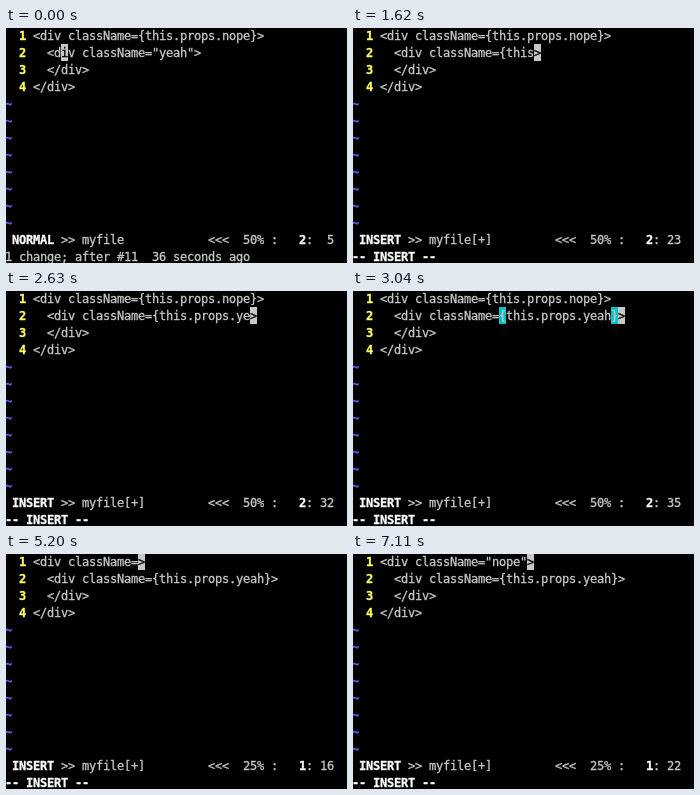
Animation, 341 px wide and 235 px high, one loop 8000 ms. Source, as an HTML page:

```html
<!DOCTYPE html>
<html lang="en">
<head>
<meta charset="utf-8">
<title>Editor session</title>
<style>
  html, body { margin: 0; width: 100%; height: 100%; overflow: hidden; background: #000; }
  svg { display: block; width: 341px; height: 235px; }
  text {
    font: 12px "DejaVu Sans Mono", "Liberation Mono", monospace; white-space: pre;
    color: #c7c7c7; fill: currentColor; stroke: currentColor; stroke-width: 0.3px;
  }
  .strong { font-weight: bold; color: #fff; }
  .number { font-weight: bold; color: #ffff5c; }
  .tilde { font-weight: bold; color: #5f5fff; }
  .under-cursor { color: #000; }
  .cursor { fill: #c7c7c7; }
  .match { fill: #00c5c7; }
</style>
</head>
<body>
<svg viewBox="0 0 341 235"><rect width="341" height="235"/><g id="screen"></g></svg>
<script>
const LOOP = 8000;
const CELL_W = 7, CELL_H = 17, ORIGIN = -1, BASELINE = 12;
const GUTTER = 4, STATUS_ROW = 12, MESSAGE_ROW = 13;
const screen = document.getElementById('screen');

const OUTER = '<div className=', INNER = '  <div className=';
const BEFORE = [OUTER + '{this.props.nope}>', INNER + '"yeah">', '  </div>', '</div>'];

// Each step: start time, mode, cursor row, cursor column, lines, extras
const steps = [{
  time: 0, mode: 'NORMAL', row: 1, col: 4, lines: BEFORE,
  file: 'myfile', message: '1 change; after #11  36 seconds ago'
}];

function type(row, prefix, typed, keys) {
  const base = steps[steps.length - 1].lines;
  for (const [time, count] of keys) {
    const text = prefix + typed.slice(0, count);
    const lines = base.map((line, i) => i === row ? text + '>' : line);
    steps.push({ time, mode: 'INSERT', row, col: text.length, lines, file: 'myfile[+]' });
  }
}

type(1, INNER, '{this.props.yeah}', [
  [500, 0], [1100, 1],
  [1390, 2], [1510, 4], [1620, 5], [1740, 6],
  [1920, 7], [2010, 8], [2100, 9], [2150, 10], [2240, 11], [2330, 12],
  [2510, 13], [2630, 14], [2690, 15], [2750, 16], [3040, 17]
]);
const closed = steps[steps.length - 1];
closed.match = [INNER.length, closed.col - 1];

steps.push({
  time: 4240, mode: 'NORMAL', row: 0, col: BEFORE[0].length - 1,
  lines: closed.lines, file: 'myfile[+]', message: ''
});

type(0, OUTER, '"nope"', [
  [5200, 0], [6160, 1], [6520, 2], [6640, 3], [6760, 4], [6880, 5], [7110, 6]
]);

const cellX = col => ORIGIN + col * CELL_W;

function add(name, attrs, content = '') {
  const node = document.createElementNS('http://www.w3.org/2000/svg', name);
  for (const key in attrs) node.setAttribute(key, attrs[key]);
  node.textContent = content;
  screen.append(node);
}

function print(row, col, content, style = '') {
  if (!content) return;
  const x = [...content].map((_, i) => cellX(col + i)).join(' ');
  add('text', { x, y: BASELINE + row * CELL_H, class: style }, content);
}

function block(row, col, style) {
  add('rect', {
    x: cellX(col), y: ORIGIN + row * CELL_H, width: CELL_W, height: CELL_H, class: style
  });
}

function draw(step) {
  screen.replaceChildren();
  const { mode, row, col, lines, file } = step;

  for (const c of step.match || []) block(row, GUTTER + c, 'match');
  block(row, GUTTER + col, 'cursor');

  lines.forEach((line, i) => {
    print(i, 2, String(i + 1), 'number');
    if (i !== row) return print(i, GUTTER, line);
    print(i, GUTTER, line.slice(0, col));
    print(i, GUTTER + col, line[col], 'under-cursor');
    print(i, GUTTER + col + 1, line.slice(col + 1));
  });
  for (let i = lines.length; i < STATUS_ROW; i++) print(i, 0, '~', 'tilde');

  const percent = (row + 1) * 100 / lines.length;
  print(STATUS_ROW, 1, mode, 'strong');
  print(STATUS_ROW, 8, '>> ' + file);
  print(STATUS_ROW, 29, `<<<  ${percent}% :`);
  print(STATUS_ROW, 42, String(row + 1), 'strong');
  print(STATUS_ROW, 43, ':' + String(col + 1).padStart(3));

  if (mode === 'INSERT') print(MESSAGE_ROW, 0, '-- INSERT --', 'strong');
  else print(MESSAGE_ROW, 0, step.message);
}

let shown = null;
const start = performance.now();

function tick() {
  const time = (performance.now() - start) % LOOP;
  const step = steps.findLast(s => s.time <= time);
  if (step !== shown) draw(shown = step);
  requestAnimationFrame(tick);
}
tick();
</script>
</body>
</html>
```
